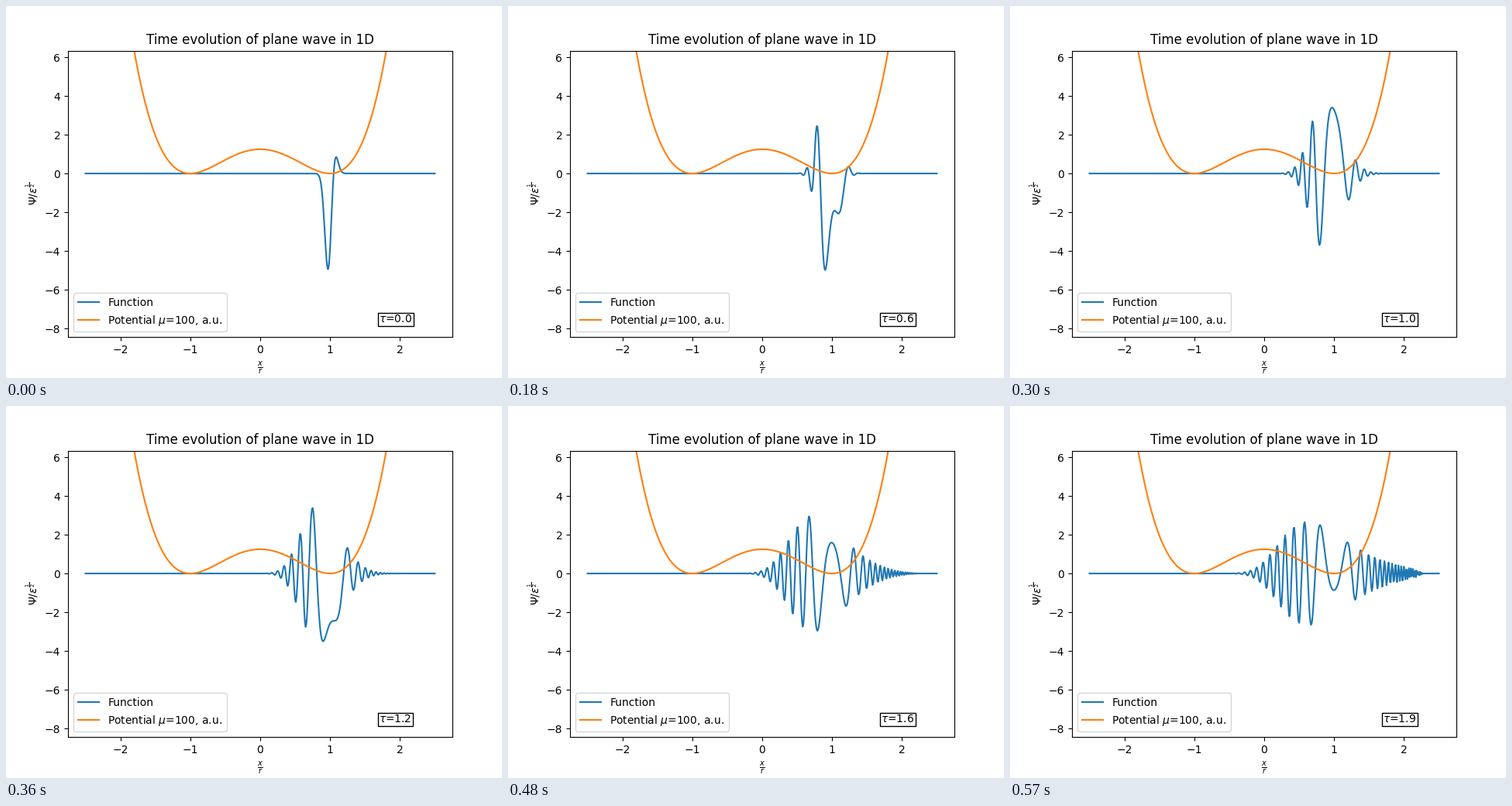
Recreate the animation shown at these times as a matplotlib script. Size 640x480 px, loop 0.6 s.

```python
import numpy as np
import matplotlib.pyplot as plt
from matplotlib.animation import FuncAnimation

FRAMES, INTERVAL, DT = 20, 30, 0.1
MU, EPS = 100, 0.01
X0, WIDTH, AMP = 1.0, 0.0566, 7.85
K0, PHASE, OMEGA = -10.0, 2.08, 11.43

x = np.linspace(-2.5, 2.5, 501)
well = (x**2 - 1)**2

# Lattice Hamiltonian: second difference plus the quartic term
hop = np.full(x.size - 1, -0.5 / (MU * EPS**2))
H = np.diag(1 / (MU * EPS**2) - MU / 8 * well) + np.diag(hop, 1) + np.diag(hop, -1)
energy, modes = np.linalg.eigh(H)

d = x - X0
psi0 = AMP * np.exp(-d**2 / (2 * WIDTH**2) + 1j * (K0 * d + PHASE))
coef = modes.T @ psi0


def wave(t):
    return (modes @ (coef * np.exp(1j * (OMEGA - energy) * t))).real


fig, ax = plt.subplots(figsize=(6.4, 4.8), dpi=100)
line, = ax.plot(x, wave(0), label="Function")
ax.plot(x, 1.25 * well, label=r"Potential $\mu$=100, a.u.")
ax.set_xlim(-2.75, 2.75)
ax.set_ylim(-8.437, 6.336)
ax.set_title("Time evolution of plane wave in 1D")
ax.set_xlabel(r"$\frac{x}{r}$")
ax.set_ylabel(r"$\Psi/\epsilon^{\frac{1}{2}}$")
ax.legend(loc="lower left")
clock = ax.text(1.7, -7.68, "", bbox=dict(facecolor="white", edgecolor="black", pad=1))


def update(i):
    t = i * DT
    line.set_ydata(wave(t))
    clock.set_text(rf"$\tau$={t:.1f}")
    return line, clock


anim = FuncAnimation(fig, update, frames=FRAMES, interval=INTERVAL,
                     repeat=True, repeat_delay=0)
plt.show()
```
